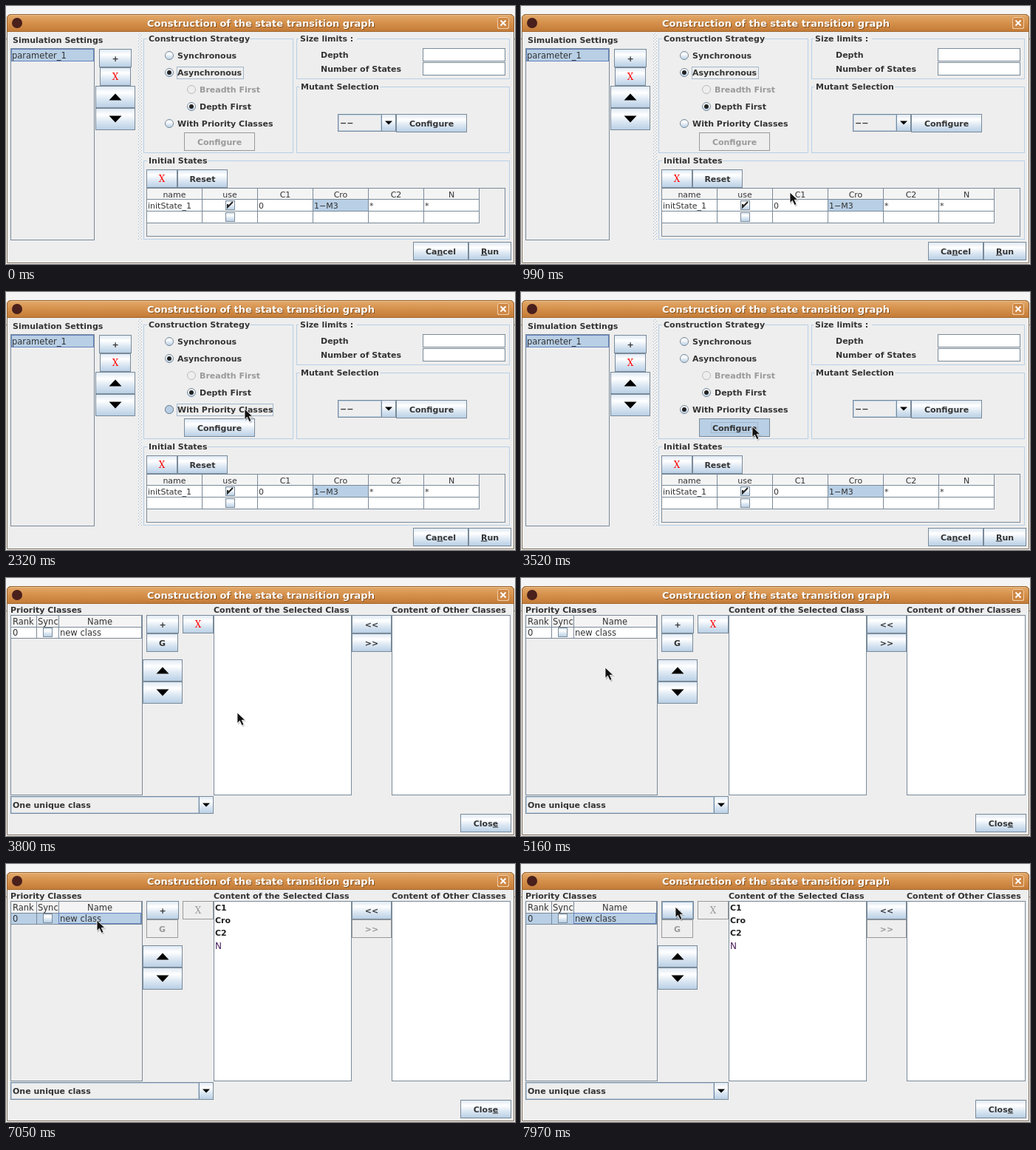
An HTML page that plays this animation: 689x349 px, repeating every 8000 ms.

```html
<!DOCTYPE html>
<html lang="en">
<head>
<meta charset="utf-8">
<title>State transition graph dialog</title>
<style>
  html, body { margin: 0; width: 100%; height: 100%; overflow: hidden; background: #f5f5f5; }
  svg { display: block; width: 689px; height: 349px; }
  text { font: bold 11px "DejaVu Sans", sans-serif; fill: #333; white-space: pre; }
  .plain { font-weight: normal; }
  .title { font-size: 13px; fill: #fff; }
  .u { text-decoration: underline; }
  rect { shape-rendering: crispEdges; }
</style>
</head>
<body>
<svg id="stage" viewBox="0 0 689 349" xmlns="http://www.w3.org/2000/svg"></svg>
<script>
const LOOP = 8000, TICK = 40;
const EDGE = '#7a8a99', SELECT = '#b8cfe5', PANEL = '#eee', FOCUS = '#6382bf', GREY = '#999';

// Drawing helpers; boxes are given by their edge pixels.
const box = (x, y, x2, y2, fill = 'none', stroke = EDGE) =>
  `<rect x="${x + .5}" y="${y + .5}" width="${x2 - x - 1}" height="${y2 - y - 1}" fill="${fill}" stroke="${stroke}"/>`;
const fill = (x, y, x2, y2, color) =>
  `<rect x="${x}" y="${y}" width="${x2 - x}" height="${y2 - y}" fill="${color}"/>`;
const label = (x, y, text, attrs = '') => `<text x="${x}" y="${y}" ${attrs}>${text}</text>`;
const plain = (x, y, text, size = 11, color = '#333') =>
  label(x, y, text, `class="plain" style="font-size:${size}px;fill:${color}"`);
const middle = (x, y, text, style = '') => label(x, y, text, `text-anchor="middle" style="${style}"`);
const header = (x, y, text, size = 11) => middle(x, y, text, `font-weight:normal;font-size:${size}px`);
const span = (from, to, markup) => `<g data-from="${from}" data-to="${to}">${markup}</g>`;
const under = c => `<tspan class="u">${c}</tspan>`;

function button(x, y, x2, y2, text, state = 'up', style = '') {
  const face = { off: PANEL, down: SELECT }[state] || 'url(#metal)';
  const color = state === 'off' ? `${style};fill:${GREY}` : style;
  return box(x, y, x2, y2, face, state === 'off' ? GREY : EDGE)
    + (state === 'hover' ? box(x + 1, y + 1, x2 - 1, y2 - 1, 'none', '#8fa9c4') : '')
    + middle((x + x2) / 2, (y + y2) / 2 + 4, text, color);
}

const CROSS = 'font:12px \'DejaVu Serif\',\'Noto Serif\',serif;fill:#f00';
const cross = (x, y, x2, y2, state) => button(x, y, x2, y2, 'X', state, CROSS);

const triangle = (cx, cy, w, h) => `<path d="M${cx - w} ${cy - h / 2}h${2 * w}l${-w} ${h}z" fill="#000"/>`;
const arrowButton = (x, y, up) =>
  button(x, y, x + 54, y + 30, '') + triangle(x + 27, y + 15, 8.5, up ? -9 : 9);

function combo(x, y, x2, y2, text) {
  return box(x, y, x2, y2, PANEL) + box(x + 1, y + 1, x2 - 20, y2 - 1, 'none', SELECT)
    + button(x2 - 20, y, x2, y2, '')
    + triangle(x2 - 10, (y + y2) / 2, 5, 5) + label(x + 3, y + 16, text);
}

function group(x, y, x2, y2, text, titleX, titleWidth) {
  return box(x, y, x2, y2, 'none', SELECT)
    + fill(titleX - 2, y - 3, titleX + titleWidth, y + 4, PANEL) + label(titleX, y + 4, text);
}

const radio = (x, y, face = 'url(#metal)', edge = EDGE) =>
  `<circle cx="${x}" cy="${y}" r="5.5" fill="${face}" stroke="${edge}"/>`;
const dot = (x, y) => `<circle cx="${x}" cy="${y}" r="3" fill="#222"/>`;
const hover = (x, y) => `<circle cx="${x}" cy="${y}" r="4.2" fill="none" stroke="${SELECT}" stroke-width="1.6"/>`;
const focus = (x, y, x2, y2) => box(x, y, x2, y2, 'none', '#a3b8cc');
const check = (x, y) => box(x, y, x + 13, y + 13, 'url(#metal)');

const defs = `<defs>
  <linearGradient id="metal" x2="0" y2="1">
    <stop stop-color="#dde8f3"/><stop offset=".3" stop-color="#fff"/>
    <stop offset=".6" stop-color="#dde8f3"/><stop offset="1" stop-color="${SELECT}"/>
  </linearGradient>
  <linearGradient id="bar" x2="0" y2="1">
    <stop stop-color="#e3aa6c"/><stop offset=".45" stop-color="#d6924d"/><stop offset="1" stop-color="#c27a36"/>
  </linearGradient>
  <pattern id="bumps" width="4" height="4" patternUnits="userSpaceOnUse">
    <path d="M0 0h1v1h-1zM2 2h1v1h-1z" fill="#fff"/><path d="M1 1h1v1h-1zM3 3h1v1h-1z" fill="#a3b8cc"/>
  </pattern>
</defs>`;

const frame = fill(0, 0, 689, 349, '#f5f5f5') + fill(0, 44, 689, 45, '#888')
  + `<path d="M1.5 347.5V17q0-5.5 5.5-5.5H682q5.5 0 5.5 5.5V347.5z" fill="${PANEL}" stroke="#80705f"/>`
  + '<path d="M1.5 35V17q0-5.5 5.5-5.5H682q5.5 0 5.5 5.5V35z" fill="url(#bar)"/>'
  + '<path d="M1.5 35V17q0-5.5 5.5-5.5H682q5.5 0 5.5 5.5V35" fill="none" stroke="#94602d"/>'
  + fill(6, 12, 683, 13, '#ecc08c') + fill(2, 34, 687, 35, '#a3672d')
  + '<circle cx="15" cy="23" r="7" fill="#49201c"/>'
  + label(192, 29, 'Construction of the state transition graph', 'class="title" style="fill:#85511f"')
  + label(191, 28, 'Construction of the state transition graph', 'class="title"')
  + '<rect x="665.5" y="15.5" width="15" height="15" rx="3" fill="#cf8845" stroke="#f0cda6"/>'
  + '<path d="M669.5 19.5l7 7m0-7l-7 7" stroke="#fff" stroke-width="2"/>';

function settingsPane() {
  return label(9, 50, 'Simulation Settings') + box(6, 57, 120, 317)
    + box(7, 58, 119, 75, SELECT, FOCUS) + plain(8, 71, 'parameter_1', 11.5)
    + button(126, 58, 170, 83, '+') + cross(127, 83, 169, 108)
    + arrowButton(121, 108, true) + arrowButton(121, 138, false)
    + fill(179, 37, 184, 317, 'url(#bumps)');
}

function strategyPane() {
  return group(186, 44, 389, 199, 'Construction Strategy', 193, 137)
    + radio(221, 67) + label(232, 71, 'Synchronous')
    + radio(221, 90) + label(232, 94, 'Asynchronous')
    + radio(251, 113, PANEL, '#bbb') + label(262, 117, 'Breadth First', `style="fill:${GREY}"`)
    + radio(251, 136) + dot(251, 136) + label(262, 140, 'Depth First')
    + radio(221, 159) + label(232, 163, 'With Priority Classes')
    + span(0, 2360, dot(221, 90))
    + span(0, 2120, focus(231, 82, 322, 99))
    + span(1390, 1590, hover(251, 136))
    + span(1590, 2120, hover(221, 159))
    + span(2120, 2360, radio(221, 159, SELECT))
    + span(2360, 3800, dot(221, 159))
    + span(2360, 2800, hover(221, 159))
    + span(2120, 3520, focus(231, 151, 362, 168))
    + span(0, 2320, button(241, 171, 337, 196, 'Configure', 'off'))
    + span(2320, 2840, button(241, 171, 337, 196, 'Configure'))
    + span(2840, 3520, button(241, 171, 337, 196, 'Configure', 'hover'))
    + span(3520, 3800, button(241, 171, 337, 196, 'Configure', 'down') + focus(257, 176, 321, 191));
}

function limitsPane() {
  return group(393, 44, 682, 99, 'Size limits :', 398, 77)
    + label(426, 70, 'Depth') + box(564, 57, 676, 75, '#fff')
    + label(426, 89, 'Number of States') + box(564, 76, 676, 94, '#fff')
    + group(393, 109, 682, 199, 'Mutant Selection', 399, 107)
    + combo(449, 146, 528, 170, '−−') + button(528, 146, 624, 171, 'Configure');
}

function statesPane() {
  const columns = ['name', 'use', 'C1', 'Cro', 'C2', 'N'];
  const values = ['initState_1', '', '0', '1−M3', '*', '*'];
  let out = group(186, 209, 682, 316, 'Initial States', 193, 80)
    + cross(190, 221, 232, 246) + button(232, 221, 300, 246, 'Reset')
    + box(190, 246, 676, 312);
  columns.forEach((name, i) => {
    const x = 190 + 75 * i, x2 = x + 76;
    out += box(x, 246, x2, 262, '#f4f4f4') + header((x + x2) / 2, 259, name)
      + box(x, 261, x2, 278, name === 'Cro' ? SELECT : '#fff') + box(x, 277, x2, 294, '#fff')
      + plain(x + 2, 274, values[i]);
  });
  return out + check(297, 263) + check(297, 279)
    + '<path d="M300 268v4l7-7" fill="none" stroke="#222" stroke-width="2"/>'
    + button(551, 319, 626, 344, `Ca${under('n')}cel`) + button(626, 319, 684, 344, `${under('R')}un`);
}

function prioritySheet() {
  const cells = color => box(6, 66, 42, 82, color) + box(41, 66, 72, 82, color) + box(71, 66, 184, 82, color);
  const members = ['C1', 'Cro', 'C2'].map((name, i) => label(283, 63 + 17 * i, name, 'style="fill:#222"')).join('');
  return label(6, 47, 'Priority Classes') + label(281, 47, 'Content of the Selected Class')
    + label(522, 47, 'Content of Other Classes')
    + box(6, 50, 185, 294)
    + box(6, 50, 42, 67, '#f4f4f4') + box(41, 50, 72, 67, '#f4f4f4') + box(71, 50, 184, 67, '#f4f4f4')
    + plain(9, 63, 'Rank', 11.5) + plain(43, 63, 'Sync', 11.5) + header(127, 63, 'Name', 11.5)
    + span(3800, 6200, cells('#fff'))
    + span(6200, LOOP, cells(SELECT) + box(71, 66, 183, 81, 'none', FOCUS))
    + plain(9, 78, '0', 11.5) + check(50, 67) + plain(73, 78, 'new class', 11.5)
    + box(281, 50, 468, 294, '#fff') + box(522, 50, 683, 294, '#fff')
    + span(6240, LOOP, members + plain(283, 115, 'N', 12, '#4a1c5c'))
    + span(3800, 7770, button(190, 50, 234, 75, '+'))
    + span(7770, LOOP, button(190, 50, 234, 75, '+', 'hover'))
    + span(3800, 6240, cross(239, 50, 281, 75)
      + button(190, 75, 233, 100, 'G') + button(468, 75, 522, 100, '&gt;&gt;'))
    + span(6240, LOOP, cross(239, 50, 281, 75, 'off')
      + button(190, 75, 233, 100, 'G', 'off') + button(468, 75, 522, 100, '&gt;&gt;', 'off'))
    + button(468, 50, 522, 75, '&lt;&lt;')
    + arrowButton(185, 110, true) + arrowButton(185, 140, false)
    + combo(6, 295, 281, 319, 'One unique class')
    + button(615, 319, 684, 344, `Clos${under('e')}`);
}

const pointer = `<g id="pointer">
  <path d="M1 2v15l3.5-3.5 2.8 6 3-1.4-2.7-5.8h5z" fill="#000" opacity=".18"/>
  <path d="M0 0v14.5l3.4-3.2 2.8 6.2 2.8-1.3-2.8-5.9h4.6z" fill="#111" stroke="#fff" stroke-width=".8"/>
</g>`;

const stage = document.getElementById('stage');
stage.innerHTML = defs + frame
  + span(0, 3800, settingsPane() + strategyPane() + limitsPane() + statesPane())
  + span(3800, LOOP, prioritySheet()) + pointer;

// Pointer moves: start, end, then evenly timed points on a smooth curve.
const moves = [
  [790, 1470, [559, 338], [430, 285], [295, 215], [207, 160], [255, 128], [336, 140]],
  [1470, 1750, [336, 140], [332, 149], [318, 153], [323, 158]],
  [2680, 2960, [323, 158], [319, 172], [313, 182]],
  [4320, 4360, [313, 181], [314, 180]],
  [4560, 5160, [311, 184], [255, 203], [180, 196], [130, 160], [114, 121]],
  [5160, 5360, [114, 121], [112, 102], [115, 87]],
  [5400, 5560, [106, 80], [84, 72], [104, 71], [123, 76]],
  [7050, 7850, [123, 76], [60, 75], [12, 72], [60, 68], [150, 63], [202, 60]],
  [7970, 8000, [209, 58], [209, 58]],
];

function curve(points, u) {
  const last = points.length - 1;
  const i = Math.min(Math.floor(u * last), last - 1), f = u * last - i;
  const at = k => points[Math.max(0, Math.min(last, k))];
  return [0, 1].map(k => {
    const [a, b, c, d] = [at(i - 1)[k], at(i)[k], at(i + 1)[k], at(i + 2)[k]];
    return b + f / 2 * (c - a + f * (2 * a - 5 * b + 4 * c - d + f * (3 * (b - c) + d - a)));
  });
}

const spans = [...stage.querySelectorAll('[data-from]')];
const arrow = document.getElementById('pointer');

function render(t) {
  for (const el of spans) {
    el.style.display = t >= +el.dataset.from && t < +el.dataset.to ? '' : 'none';
  }
  const move = moves.filter(m => m[0] <= t).pop();
  arrow.style.display = move ? '' : 'none';
  if (!move) return;
  const [start, end, ...points] = move;
  const u = Math.min(1, Math.floor((t - start) / TICK) * TICK / (end - start));
  arrow.setAttribute('transform', `translate(${curve(points, u).map(Math.round)})`);
}

const began = performance.now();
function tick() {
  render((performance.now() - began) % LOOP);
  requestAnimationFrame(tick);
}
tick();
</script>
</body>
</html>
```
